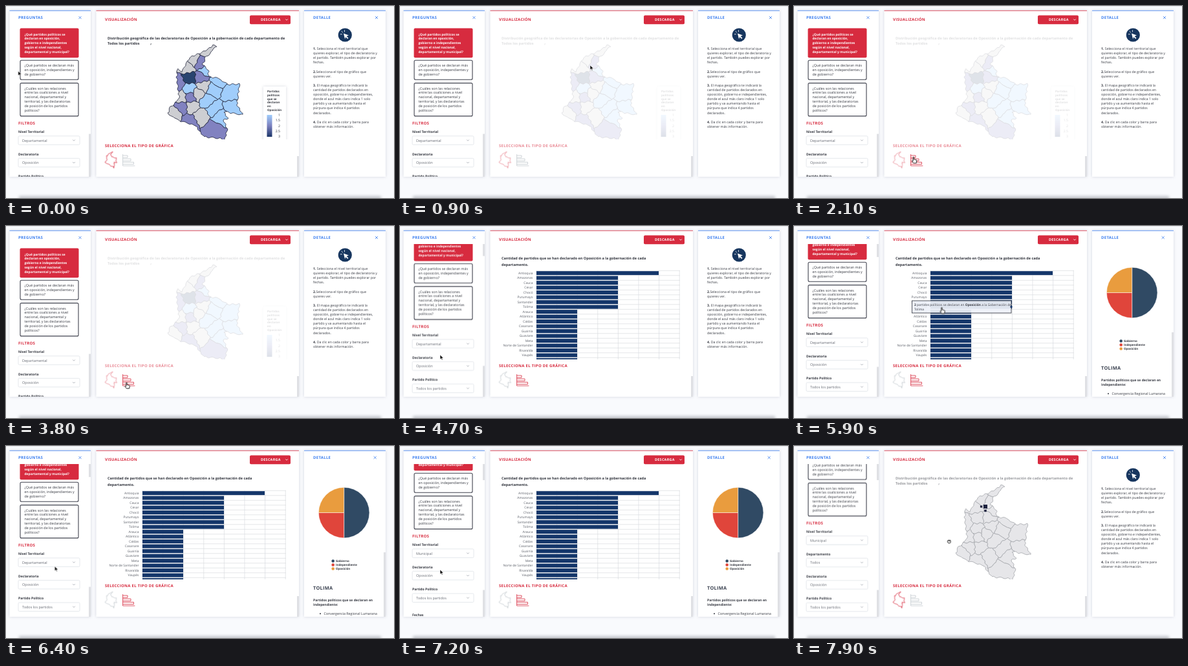
Write an HTML page that moves like this. It is 600 px wide and 298 px high and loops after 8 s.

```html
<!DOCTYPE html>
<html lang="es">
<head>
<meta charset="utf-8">
<style>
html, body { margin: 0; width: 100%; height: 100%; overflow: hidden; background: #f9fafd; }
svg { display: block; width: 600px; height: 298px; }
text { font-family: "Open Sans", "Noto Sans", sans-serif; text-rendering: geometricPrecision; white-space: pre; }
.panel { fill: #fff; filter: drop-shadow(0 0 2px rgba(70, 80, 110, .22)); }
.head { font-weight: 700; letter-spacing: .3px; }
.bold { font-weight: 700; }
.box { fill: #fff; stroke: #40434f; stroke-width: 1.1; }
.field { fill: #fff; stroke: #dfe2e7; stroke-width: .8; }
.track { fill: #dfe0e4; }
.line { fill: none; stroke-width: .8; stroke-linecap: round; }
</style>
</head>
<body>
<svg id="stage" viewBox="0 0 600 298" xmlns="http://www.w3.org/2000/svg"></svg>
<script>
const LOOP = 8000;
const BLUE = '#3c7ff0', RED = '#d72b3f', NAVY = '#14366a', INK = '#33363f', GREY = '#c3c9cf';

// ---- markup helpers (text y is the middle of the line) ----
const text = (x, y, s, size = 5.35, fill = INK, more = '') =>
  `<text x="${x}" y="${y + size * .36}" font-size="${size}" fill="${fill}" ${more}>${s}</text>`;
const bold = (x, y, s, size = 5.1, fill = INK) => text(x, y, s, size, fill, 'class="bold"');
const head = (x, y, s, fill, size = 6) => text(x, y, s, size, fill, 'class="head"');
const strong = s => `<tspan class="bold">${s}</tspan>`;
const lines = (x, y, step, list, draw = text, ...rest) =>
  list.map((s, i) => draw(x, y + i * step, s, ...rest)).join('');
const rect = (x, y, w, h, more = '') => `<rect x="${x}" y="${y}" width="${w}" height="${h}" ${more}/>`;
const group = (id, body) => `<g id="${id}">${body}</g>`;
const clipped = (id, body) => `<g clip-path="url(#${id})">${body}</g>`;
const line = (d, color) => `<path class="line" d="${d}" stroke="${color}"/>`;
const chevron = (x, y, color) => line(`M${x - 1.5} ${y - .8}l1.5 1.5 1.5-1.5`, color);
const cross = (x, y) => line(`M${x - 1.8} ${y - 1.8}l3.6 3.6m0-3.6l-3.6 3.6`, BLUE);
const panel = (x, w, color) => rect(x, 7, w, 258, 'class="panel"') + rect(x, 6.8, w, 1, `fill="${color}" opacity=".8"`);

// ---- map: a rough coast and department centres, borders bent by a smooth field ----
const coast = [
  [320, 61], [325, 63], [308, 81], [304, 92], [313, 99], [313, 110], [329, 112], [342, 122], [361, 121], [357, 154],
  [366, 169], [337, 164], [343, 174], [336, 177], [342, 191], [336, 221], [330, 215], [335, 206], [306, 203],
  [294, 186], [265, 177], [250, 166], [255, 156], [268, 144], [264, 112], [265, 98], [272, 102], [284, 80], [304, 72]
];
const parties = [
  { color: '#cdced2', at: [[312, 70], [290, 83], [280, 96], [305, 124], [297, 136], [271, 143], [287, 156], [260, 167], [301, 171]] },
  { color: '#a0cdfb', at: [[309, 100], [328, 117], [321, 129], [347, 136], [311, 147], [350, 157], [321, 160], [331, 172], [284, 128]] },
  { color: '#8182c0', at: [[302, 88], [302, 112], [266, 119], [285, 142], [272, 156], [284, 180], [321, 191]] },
  { color: '#29446f', at: [[283, 112]] }
];
const centres = parties.flatMap(p => p.at);
const frame = [[240, 50], [380, 50], [380, 230], [240, 230]];
const edges = poly => poly.map((p, i) => [p, poly[(i + 1) % poly.length]]);
const mix = (p, q, k) => p.map((v, i) => v + k * (q[i] - v));
const bend = ([x, y]) => [x + Math.sin(.7 * y + .2 * x), y + Math.sin(.6 * x - .3 * y)];

// keeps the part of a polygon that lies nearer to a than to b
function cut(poly, a, b) {
  const mid = mix(a, b, .5);
  const side = p => (p[0] - mid[0]) * (b[0] - a[0]) + (p[1] - mid[1]) * (b[1] - a[1]);
  return edges(poly).flatMap(([p, q]) => {
    const sp = side(p), sq = side(q);
    return [...(sp <= 0 ? [p] : []), ...(sp * sq < 0 ? [mix(p, q, sp / (sp - sq))] : [])];
  });
}
function border(poly) {
  const points = edges(poly).flatMap(([p, q]) => {
    const n = Math.ceil(Math.hypot(q[0] - p[0], q[1] - p[1]) / 2);
    return Array.from({ length: n }, (_, i) => bend(mix(p, q, i / n)));
  });
  return 'M' + points.map(p => p.map(v => v.toFixed(1)).join(' ')).join('L') + 'Z';
}
const outline = border(coast);
const cell = a => border(centres.filter(b => b !== a).reduce((poly, b) => cut(poly, a, b), frame));
const map = (stroke, fill) => `<g stroke="${stroke}" stroke-width=".8" stroke-linejoin="round">` +
  clipped('country', parties.map(p => p.at.map(a => `<path d="${cell(a)}" fill="${fill || p.color}"/>`).join('')).join('')) +
  `<path d="${outline}" fill="none"/></g>`;

// ---- left panel ----
const ROW = 34.6;
const value = s => (x, y) => text(x, y, s, 5.5, '#666a73');
const field = (row, label, draw) => {
  const y = 195.3 + row * ROW;
  return bold(19, y, label, 5.1) + rect(19, y + 6.5, 95, 13.5, 'rx="1.5" class="field"') +
    draw(25, y + 13.3) + chevron(105, y + 13.3, '#a0a4ac');
};
const card = (y, h, list) => rect(22, y, 90, h, 'rx="2" class="box"') + lines(28.5, y + 8, 6.95, list);
const questions = () =>
  rect(21.5, 34.5, 91, 45.7, `rx="2" fill="${RED}"`) +
  lines(28.5, 43.8, 6.9, ['¿Qué partidos políticos se', 'declaran en oposición,', 'gobierno e independientes',
    'según el nivel nacional,', 'departamental y municipal?'], bold, 4.95, '#fff') +
  card(84.3, 30, ['¿Qué partidos se declaran más', 'en oposición, independientes y', 'de gobierno?']) +
  card(119.6, 51.3, ['¿Cuáles son las relaciones', 'entre las coaliciones a nivel', 'nacional, departamental y',
    'territorial, y las declaratorias', 'de posición de los partidos', 'políticos?']);
const filters = () => head(19, 182, 'FILTROS', RED) +
  field(0, 'Nivel Territorial', (x, y) =>
    group('levelA', value('Departamental')(x, y)) + group('levelB', value('Municipal')(x, y))) +
  group('depto', field(1, 'Departamento', value('Todos'))) +
  group('rest', field(1, 'Declaratoria', value('Oposición')) +
    field(2, 'Partido Político', value('Todos los partidos')) + bold(19, 304, 'Fechas', 5.1));
const left = () => panel(5.5, 125.5, BLUE) +
  clipped('view', group('scroll', questions() + filters()) +
    rect(128, 28, 3, 237, 'class="track"') + rect(128, 28, 3, 170.5, 'id="thumb" fill="#fff"')) +
  head(19, 18, 'PREGUNTAS', BLUE) + cross(114.5, 18);

// ---- middle panel ----
const legend = () => rect(398, 125, 35, 90, 'class="panel"') +
  lines(404, 132.3, 5.85, ['Partidos', 'políticos', 'que se', 'declaran', 'en', 'Oposición'], bold, 4.5) +
  rect(403.5, 169, 8, 34, 'fill="url(#scale)"') +
  lines(424, 169.2, 8.3, ['1', '1.5', '2', '2.5', '3'], text, 5.2, INK, 'text-anchor="end"');
const mapTitle = () => lines(157, 49.6, 8.8, ['Distribución geográfica de las declaratorias de Oposición a la gobernación de cada departamento de',
  'Todos los partidos'], bold, 5.5) + line('M224.3 58.4l-.5 1.6', INK);
const names = ['Antioquia', 'Amazonas', 'Cauca', 'Cesar', 'Chocó', 'Putumayo', 'Santander', 'Tolima', 'Arauca',
  'Atlántico', 'Caldas', 'Casanare', 'Guainía', 'Guaviare', 'Meta', 'Norte de Santander', 'Risaralda', 'Vaupés', ''];
const count = i => i < 1 ? 3 : i < 8 ? 2 : 1;
function chart() {
  let grid = '';
  for (let y = 69.3; y < 207; y += 7.5) grid += `M211 ${y}H433`;
  for (let x = 211; x < 434; x += 31.6) grid += `M${x} 69V207`;
  return lines(157, 49.8, 10, ['Cantidad de partidos que se han declarado en Oposición a la gobernación de cada',
    'departamento.'], bold, 5.5) +
    `<path d="${grid}" stroke="#d9dbe0" stroke-width=".7"/>` +
    names.map((n, i) => text(205.5, 73 + i * 7.5, n, 5, '#5b5f68', 'text-anchor="end"') +
      rect(211, 70.1 + i * 7.5, 63 * count(i), 6, `fill="${NAVY}"`)).join('');
}
const tooltip = () => rect(182.5, 116, 153.5, 19, 'fill="#eef2f9" fill-opacity=".93" stroke="#2b2f38" stroke-width=".8"') +
  lines(186, 122.7, 6.1, [`${strong('2')} partidos políticos se declaran en ${strong('Oposición')} a la Gobernación de`, 'Tolima'], text, 4.9) +
  `<circle cx="336" cy="125.5" r="1.7" fill="${NAVY}"/>`;
const town = (x, y, s) => rect(x - s / 2, y - s / 2, s, s, 'fill="#1d2340"');
const mapIcon = (id, color) => group(id, `<path d="${outline}" fill="none" stroke="${color}" stroke-width="6"
  transform="translate(153.3 226.3) scale(.157) translate(-250 -61)"/>`);
const barIcon = (id, color) => group(id, line('M180.6 230.5V248H199' +
  [7, 12, 16.5].map((w, i) => `M181 ${232 + i * 5.2}h${w}v3.2h-${w}`).join(''), color));
const middle = () => panel(139.5, 313.5, RED) +
  head(153, 21, 'VISUALIZACIÓN', RED) +
  rect(377, 14.5, 63, 13.8, `rx="2" fill="${RED}"`) + head(394, 21.4, 'DESCARGA', '#fff', 5.4) + chevron(434, 21.4, '#fff') +
  clipped('plot',
    group('first', mapTitle() + map('#20243a') + legend()) +
    group('chart', chart()) +
    group('second', group('title2', mapTitle()) + map('#a3a5aa', '#e6e6e9') +
      town(296, 94, 6) + town(289.5, 94, 3.2) + town(296, 100.5, 3.4))) +
  group('tip', tooltip()) +
  group('choose', head(153, 216.5, 'SELECCIONA EL TIPO DE GRÁFICA', RED) + mapIcon('mapOff', GREY) + mapIcon('mapOn', RED)) +
  barIcon('barOff', GREY) + barIcon('barOn', RED) +
  rect(450, 233, 3, 32, 'class="track"');

// ---- right panel ----
const help = () => `<circle cx="524.3" cy="45" r="10.6" fill="#17365f"/>
  <path d="M522 42.5l8 3-3.3 1.4 2.8 2.8-1.4 1.4-2.8-2.8-1.2 3z" fill="#fff"/>` +
  line('M520.6 41l-1.8-1.8M523.5 40v-2.3M519.5 43.8h-2.3', '#fff') +
  lines(475, 66.3, 7.1, [strong('1.') + ' Selecciona el nivel territorial que', 'quieres explorar, el tipo de declaratoria y',
    'el partido. También puedes explorar por', 'fechas.', '', strong('2.') + 'Selecciona el tipo de gráfico que', 'quieres ver.', '',
    strong('3.') + ' El mapa geográfico te indicará la', 'cantidad de partidos declarados en', 'oposición, gobierno e independientes,',
    'donde el azul más claro indica 1 solo', 'partido y va aumentando hasta el', 'púrpura que indica 4 partidos', 'declarados.', '',
    strong('4.') + ' Da clic en cada color y barra para', 'obtener más información.'], text, 5.2) + cross(573, 18);
const shares = [['Gobierno', .5, '#304a64'], ['Independiente', .25, '#e0453b'], ['Oposición', .25, '#e99c3e']];
function pie(cx, cy, r) {
  const rim = turn => `${cx + r * Math.sin(turn * 2 * Math.PI)} ${cy - r * Math.cos(turn * 2 * Math.PI)}`;
  let turn = 0;
  return shares.map(([, part, color]) => `<path d="M${cx} ${cy}L${rim(turn)}A${r} ${r} 0 0 1 ${rim(turn += part)}Z"
    fill="${color}" stroke="#fff" stroke-width=".5"/>`).join('');
}
const detail = () => pie(522.7, 103.5, 39.3) +
  shares.map(([name, , color], i) => `<circle cx="505.7" cy="${178.5 + 6 * i}" r="2.3" fill="${color}"/>` +
    bold(510, 178.5 + 6 * i, name, 4.5)).join('') +
  head(475, 220, 'TOLIMA', '#3a4150', 7.4) +
  lines(475, 239.3, 6.8, ['Partidos políticos que se declaran en', 'Independiente:'], bold, 5.05) +
  `<circle cx="486" cy="260.3" r="1" fill="${INK}"/>` + text(491.5, 260, 'Convergencia Regional Lumarana', 5.3) +
  rect(584, 165, 3, 100, 'class="track"') + cross(570.7, 18);
const right = () => panel(461, 126, BLUE) + head(475, 18, 'DETALLE', BLUE) + group('help', help()) + group('detail', detail());

// ---- pointer ----
const arrow = '<path d="M0 0v7l1.7-1.5 1.2 2.6 1.1-.5-1.2-2.5h2.3z" fill="#111" stroke="#fff" stroke-width=".5"/>';
const hand = '<path d="M-.8.3q.8-.9 1.5 0v3.2l3.4.9q.8.3.7 1.2l-.6 3.6h-4.4l-2.4-3.1q.1-1 1.8-.2z" fill="#fff" stroke="#111" stroke-width=".9"/>';
const grab = '<path d="M-2-1.8h4l.4 3-1 1.6h-2.8l-1.4-2zM-.7-1.6v1.4M.7-1.6v1.4" fill="#ddd" stroke="#222" stroke-width=".8"/>';

const clip = (id, body) => `<clipPath id="${id}">${body}</clipPath>`;
const stop = (offset, color) => `<stop offset="${offset}" stop-color="${color}"/>`;
document.getElementById('stage').innerHTML = `<defs>
  ${clip('view', rect(5, 28, 126, 237))}${clip('plot', rect(140, 40, 309, 167))}
  ${clip('country', `<path d="${outline}"/>`)}
  <filter id="blur" x="-5%" y="-100%" width="110%" height="300%"><feGaussianBlur stdDeviation="2"/></filter>
  <linearGradient id="scale" x1="0" y1="0" x2="0" y2="1">${stop(0, '#a0cdfb')}${stop(.5, '#7b80bf')}${stop(1, '#1b3568')}</linearGradient>
  </defs>` +
  rect(0, 0, 600, 298, 'fill="#f9fafd"') + rect(0, 0, 600, 1, 'fill="#e6e7eb"') +
  rect(20, 295, 560, 6, 'fill="#c3c5cb" filter="url(#blur)"') +
  left() + middle() + right() +
  group('pointer', group('arrow', arrow) + group('hand', hand) + group('grab', grab));

// ---- motion ----
const DIM = 200, HOVER = 1900, CHART = 4000, DETAIL = 5700, CITY = 6700, BACK = 7500;

// changes: [start, duration, new value]
function play(id, prop, first, changes, easing = 'linear') {
  const keys = [{ offset: 0, [prop]: first }];
  let last = first;
  for (const [start, time, next] of changes) {
    keys.push({ offset: start / LOOP, [prop]: last, easing }, { offset: (start + time) / LOOP, [prop]: next });
    last = next;
  }
  keys.push({ offset: 1, [prop]: last });
  document.getElementById(id).animate(keys, { duration: LOOP, iterations: Infinity });
}
const fade = (id, first, ...changes) => play(id, 'opacity', first, changes);
const show = (id, from, to) => fade(id, from ? 0 : 1, ...(from ? [[from, 0, 1]] : []), ...(to < LOOP ? [[to, 0, 0]] : []));
const hide = (id, from, to) => fade(id, 1, [from, 0, 0], [to, 0, 1]);
const place = (x, y) => `translate(${x}px, ${y}px)`;
const move = (id, from, ...changes) => play(id, 'transform', place(...from),
  changes.map(([start, time, x, y]) => [start, time, place(x, y)]), 'ease-in-out');

fade('first', 1, [DIM, 500, .15], [CHART, 0, 0]);
fade('choose', 1, [DIM, 500, .55], [CHART, 200, 1]);
fade('chart', 0, [CHART, 300, 1], [BACK, 100, 0]);
fade('second', 0, [BACK, 250, 1]);
fade('title2', 0, [BACK, 350, .5]);
fade('tip', 0, [5150, 250, 1], [6050, 150, 0]);
hide('mapOn', CHART, BACK);
show('mapOff', CHART, BACK);
hide('barOff', HOVER, BACK);
show('barOn', HOVER, BACK);
hide('help', DETAIL, BACK - 100);
show('detail', DETAIL, BACK - 100);
show('levelA', 0, CITY);
show('levelB', CITY, LOOP);
show('depto', BACK, LOOP);
move('rest', [0, 0], [BACK, 0, 0, ROW]);

const scrolls = [[4500, 28], [6800, 42], [BACK, 62.3]];
move('scroll', [0, 0], ...scrolls.map(([t, y]) => [t, 250, 0, -y]));
move('thumb', [0, 0], ...scrolls.map(([t, y]) => [t, 250, 0, Math.min(.72 * y, 25)]));

move('pointer', [18.7, 101], [150, 750, 294, 92], [1000, 800, 193, 238], [1900, 200, 185, 234.5], [2300, 800, 186.5, 243],
  [3850, 600, 62, 200], [4850, 400, 230, 129], [5300, 300, 228.5, 126.5], [6000, 500, 62, 192], [7350, 450, 240, 148]);
fade('arrow', 1, [HOVER, 0, 0], [3900, 0, 1], [5500, 0, 0], [6050, 0, 1], [7700, 0, 0]);
fade('hand', 0, [HOVER, 0, 1], [3900, 0, 0], [5500, 0, 1], [6050, 0, 0]);
show('grab', 7700, LOOP);
</script>
</body>
</html>
```
